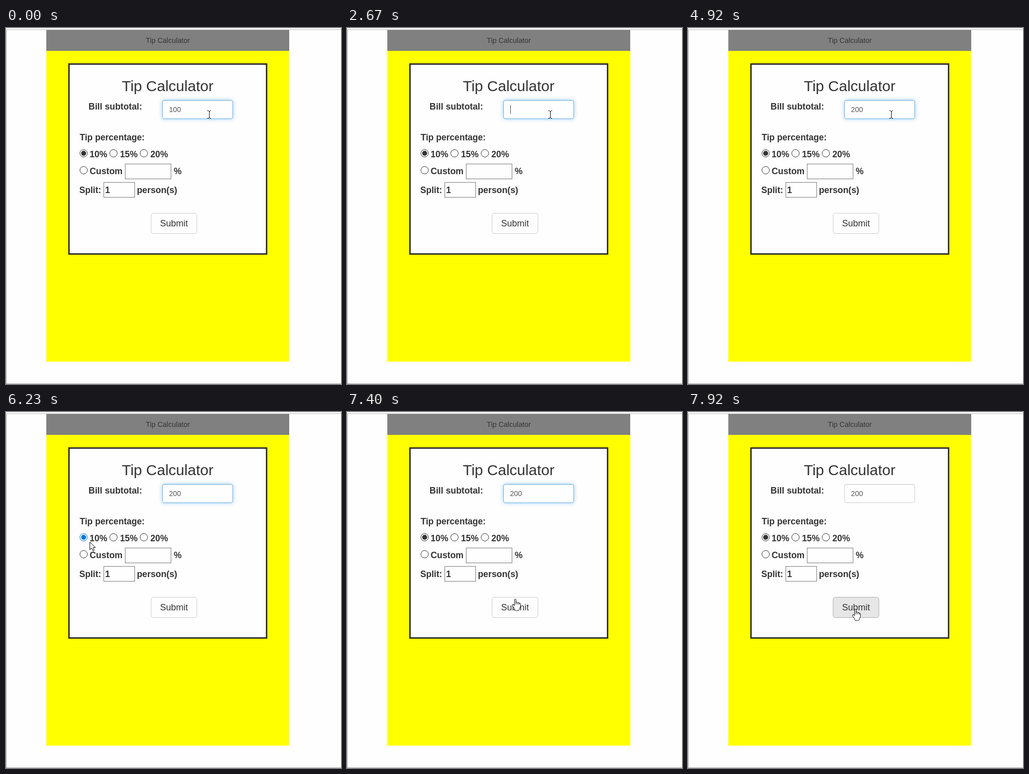
An HTML page that plays this animation: 673 px wide and 716 px high, repeating every 8 s.

```html
<!DOCTYPE html>
<html lang="en">
<head>
<meta charset="utf-8">
<title>Tip Calculator</title>
<style>
  html, body { margin: 0; width: 100%; height: 100%; overflow: hidden; background: #fefefe; }
  #stage { position: relative; width: 673px; height: 716px; overflow: hidden; }
  #stage div, svg { position: absolute; box-sizing: border-box; }
  svg { left: 0; top: 0; }
  text { font-family: "Liberation Sans", Arial, sans-serif; fill: #333; white-space: pre; }
  .chrome { left: 0; top: 0; width: 673px; height: 4px; background: #f5f5f5; border-bottom: 1px solid #c4c4c4; }
  .left { left: 0; top: 4px; width: 1px; height: 712px; background: #a0a0a0; }
  .bottom { left: 0; top: 715px; width: 673px; height: 1px; background: #a0a0a0; }
  .page { left: 81px; top: 46px; width: 488px; height: 625px; background: #ff0; }
  .head { left: 81px; top: 4px; width: 488px; height: 42px; background: #808080; }
  .panel { left: 125px; top: 71px; width: 400px; height: 385px; background: #fefefe; border: 3px solid #333; }
  .box { background: #fefefe; border: 1px solid #767676; }
  #bill { left: 314px; top: 145px; width: 142px; height: 38px; border: 1px solid #ccc; border-radius: 4px;
    background: #fefefe; box-shadow: inset 0 1px 1px rgba(0,0,0,.075); }
  #bill.focus { border-color: #66afe9; box-shadow: inset 0 1px 1px rgba(0,0,0,.075), 0 0 8px rgba(102,175,233,.6); }
  #custom { left: 239px; top: 273px; width: 93px; height: 31px; }
  #split { left: 196px; top: 310px; width: 63px; height: 31px; }
  #split.hover { border-color: #4c4c4c; }
  #submit { left: 291px; top: 372px; width: 93px; height: 42px; border: 1px solid #ccc; border-radius: 5px; background: #fefefe; }
  #submit.hover { background: #e6e6e6; border-color: #adadad; }
  #submit.down { background: #d4d4d4; border-color: #8c8c8c; box-shadow: inset 0 3px 5px rgba(0,0,0,.125); }
</style>
</head>
<body>
<div id="stage">
  <div class="chrome"></div><div class="left"></div><div class="bottom"></div>
  <div class="page"></div><div class="head"></div><div class="panel"></div>
  <div id="bill"></div>
  <div id="custom" class="box"></div><div id="split" class="box"></div>
  <div id="submit"></div>
  <svg width="673" height="716" viewBox="0 0 673 716">
    <g id="labels"></g>
    <g id="radios" fill="#fefefe"></g>
    <text id="amount" x="327.6" y="169" font-size="14.4" style="fill:#555"></text>
    <rect id="caret" y="155" width="1" height="18" fill="#444" shape-rendering="crispEdges"/>
    <g id="beam">
      <path d="M-3.5 -7.5H-1.5L.5 -6.5L2.5 -7.5H4M.5 -7V7M-3.5 7.5H-1.5L.5 6.5L2.5 7.5H4" fill="none" stroke="#000"/>
    </g>
    <g id="arrow">
      <path d="M.5 .5V16.2L4.2 12.7L6.8 18.4L9.4 17.3L6.9 11.6H11.6Z" fill="#fff" stroke="#000"/>
    </g>
    <g id="hand">
      <path d="M-2.5 1.5Q-2.5 .5 -1 .5Q.5 .5 .5 1.5V6.5Q3.5 5.5 4 7.5Q6.5 6.3 7 8.5Q9.5 7.8 9.5 10.5V15.5L7.5 19.5V21.5Q6 23.5 2.5 23.5Q-1.5 23.5 -2.5 21.5V19.5L-6.5 14Q-7 12 -5 11.5Q-4 11.5 -2.5 13.5Z" fill="#fff" stroke="#000"/>
      <path d="M.5 6V11M4 7.5V11M7 8.5V11.5" fill="none" stroke="#000"/>
    </g>
  </svg>
</div>
<script>
const LOOP = 8000;
const $ = id => document.getElementById(id);
const BLUE = '#0078d7', DARK = '#333';

function add(parent, tag, attrs, content = '') {
  const el = document.createElementNS('http://www.w3.org/2000/svg', tag);
  for (const key in attrs) el.setAttribute(key, attrs[key]);
  el.textContent = content;
  return parent.appendChild(el);
}

function label(content, x, y, size, weight = 'bold') {
  add($('labels'), 'text', { x, y, 'font-size': size, 'font-weight': weight }, content);
}

label('Tip Calculator', 281, 30, 14.4, 'normal');
label('Tip Calculator', 232.7, 127, 30, 'normal');
label('Bill subtotal:', 165.8, 164, 17.8);
label('Tip percentage:', 148, 226, 17.6);
label('10%', 168, 260, 17.7);
label('15%', 229, 260, 17.7);
label('20%', 290, 260, 17.7);
label('Custom', 168, 294, 17.8);
label('%', 337, 294, 17.8);
label('Split:', 147.2, 332, 17.6);
label('1', 199, 332, 17.8);
label('person(s)', 263, 332, 17.8);
label('Submit', 309.6, 399, 18, 'normal');

const radios = [[156, 252], [216, 252], [277, 252], [156, 286]].map(([cx, cy]) =>
  add($('radios'), 'circle', { cx, cy, r: 7.5, stroke: DARK }));
const dot = add($('radios'), 'circle', { cx: 156, cy: 252, r: 5 });

// [start, value]
const typing = [[0, '100'], [2280, '10'], [2540, '1'], [2670, ''], [3600, '2'], [4130, '20'], [4390, '200']];
const blinks = [[0, 0], [130, 1], [690, 0], [1220, 1], [1750, 0], [2280, 1], [3200, 0], [3600, 1],
  [4920, 0], [5450, 1], [5970, 0], [6490, 1], [7010, 0], [7530, 1], [7790, 0]];
// [start, shape, x, y, hovered radio]
const pointer = [
  [0, 'beam', 408, 174], [5450, 'arrow', 318, 212], [5580, 'arrow', 212, 253, 1],
  [5710, 'arrow', 170, 261, 0], [6230, 'arrow', 168, 261, 0], [6360, 'arrow', 175, 277, 3],
  [6490, 'arrow', 190, 300], [6620, 'beam', 214, 321], [6750, 'beam', 222, 326],
  [7010, 'beam', 235, 328], [7140, 'arrow', 265, 341], [7270, 'arrow', 308, 362],
  [7400, 'hand', 339, 376], [7530, 'hand', 337, 396]
];

const at = (steps, t) => steps.findLast(step => step[0] <= t);

function draw(t) {
  const value = at(typing, t)[1];
  $('amount').textContent = value;
  $('caret').setAttribute('x', 328 + 8 * value.length);
  $('caret').style.display = at(blinks, t)[1] ? '' : 'none';

  const [, shape, x, y, hovered] = at(pointer, t);
  for (const id of ['beam', 'arrow', 'hand']) $(id).style.display = id === shape ? '' : 'none';
  $(shape).setAttribute('transform', `translate(${x} ${y})`);

  radios.forEach((radio, i) => radio.setAttribute('stroke', i === hovered ? BLUE : DARK));
  dot.setAttribute('fill', hovered === 0 ? BLUE : DARK);

  $('bill').className = t < 7920 ? 'focus' : '';
  $('split').className = 'box' + (t >= 6620 && t < 7140 ? ' hover' : '');
  $('submit').className = t < 7530 ? '' : t >= 7790 && t < 7920 ? 'down' : 'hover';
}

const start = performance.now();
function tick() {
  draw((performance.now() - start) % LOOP);
  requestAnimationFrame(tick);
}
tick();
</script>
</body>
</html>
```
